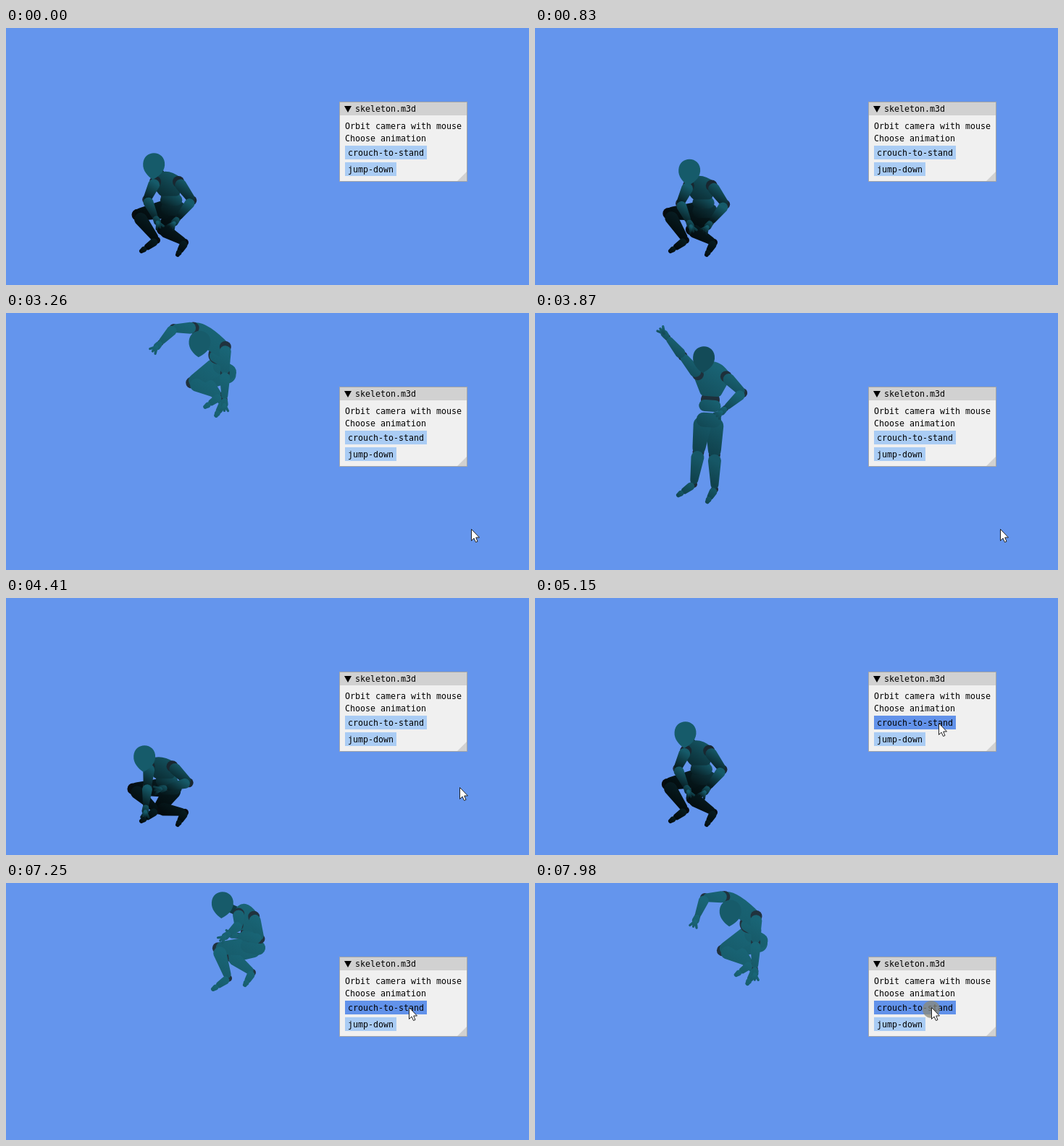
An HTML page with a canvas that plays this animation: 722 by 356 pixels, repeating every 8000 ms.

```html
<!DOCTYPE html>
<html lang="en">
<head>
<meta charset="utf-8">
<title>Skeleton animation</title>
<style>
  html, body { margin: 0; width: 722px; height: 356px; overflow: hidden; background: #6495ed; }
  canvas, svg { position: absolute; left: 0; top: 0; display: block; }
  text { font: 11.63px "DejaVu Sans Mono", monospace; fill: #000; }
</style>
</head>
<body>
<canvas id="stage" width="722" height="356"></canvas>
<svg width="722" height="356">
  <rect x="460.5" y="102.5" width="176" height="110" fill="#f0f0f0"/>
  <rect x="461" y="103" width="175" height="18" fill="#d1d1d1"/>
  <path d="M636 199V212H623Z" fill="#d1d1d1"/>
  <rect x="460.5" y="102.5" width="176" height="110" fill="none" stroke="#a1a4a8"/>
  <path d="M467 108H477L472 117Z"/>
  <text x="482" y="116">skeleton.m3d</text>
  <text x="468" y="140">Orbit camera with mouse</text>
  <text x="468" y="157">Choose animation</text>
  <rect id="stand" x="468" y="163" width="113" height="19"/>
  <text x="472" y="177">crouch-to-stand</text>
  <rect x="468" y="186" width="71" height="19" fill="#aaccf4"/>
  <text x="472" y="200">jump-down</text>
  <circle id="click" cx="547" cy="175" r="12" fill="#8b8878" fill-opacity=".75"/>
  <path id="cursor" d="M.5 .5V16.5L4 13L6.5 18.5L9 17.5L6.7 12H11.5Z" fill="#fff" stroke="#222"/>
</svg>
<script>
const LOOP = 8000, CYCLE = 4780, OFFSET = 3230;
const ctx = document.getElementById('stage').getContext('2d');
const byId = id => document.getElementById(id);
const clamp = (v, lo, hi) => Math.min(hi, Math.max(lo, v));
const mix = (a, b, u) => a.map((v, i) => v + (b[i] - v) * u);
const add = (a, b, s = 1) => [a[0] + b[0] * s, a[1] + b[1] * s];
const between = (a, b) => [b[0] - a[0], b[1] - a[1]];

// A pose fixes the trunk, wrists and ankles; elbows and knees follow from bone lengths.
const perch = {
  head: [306, 29], shoulderL: [326, 42], shoulderR: [347, 46], pelvis: [344, 88],
  handL: [313, 69], handR: [324, 72], footL: [307, 132], footR: [340, 124]
};
const vault = {
  head: [270, 41], shoulderL: [262, 19], shoulderR: [306, 46], pelvis: [306, 76],
  handL: [226, 46], handR: [304, 118], footL: [299, 112], footR: [304, 122]
};
const drop = {
  head: [233, 64], shoulderL: [225, 85], shoulderR: [264, 88], pelvis: [240, 148],
  handL: [183, 34], handR: [263, 132], footL: [219, 237], footR: [248, 244]
};
const crouch = {
  head: [204, 191], shoulderL: [206, 213], shoulderR: [238, 213], pelvis: [231, 250],
  handL: [206, 262], handR: [237, 264], footL: [208, 294], footR: [247, 297]
};

// Moves the body over planted feet, the head most and the pelvis least.
function lean(pose, dx, dy) {
  const weight = { head: 1, pelvis: .4, footL: 0, footR: 0 };
  return Object.fromEntries(Object.entries(pose).map(
    ([part, p]) => [part, add(p, [dx, dy], weight[part] ?? .65)]));
}
const blend = (a, b, u) => Object.fromEntries(
  Object.keys(a).map(part => [part, mix(a[part], b[part], u)]));

const leap = { ...blend(vault, drop, .4), handL: [160, 18] };
const lowCrouch = { ...lean(crouch, -13, 31), handL: [193, 288], handR: [221, 263] };
const landing = { ...lean(lowCrouch, 20, -75), handL: [153, 190] };

const poseKeys = [
  [0, perch], [900, lean(perch, -7, 1)], [1640, vault], [2010, leap], [2320, drop],
  [2540, landing], [2860, lowCrouch], [3230, crouch], [3500, lean(crouch, 2, -3)],
  [4000, lean(crouch, 9, 8)], [CYCLE, lean(crouch, 9, 11)]
].map(([time, pose]) => [time, Object.values(pose).flat()]);
const parts = Object.keys(perch);

const cursorKeys = [
  [2200, [663, 360]], [2460, [644, 303]], [2800, [642, 299]], [4190, [642, 299]],
  [4410, [626, 262]], [5200, [556, 172]], [7500, [556, 172]], [7850, [547, 172]]
];

// Monotone cubic interpolation: smooth, with no overshoot at holds.
function sample(keys, t) {
  const last = keys.length - 1;
  t = clamp(t, keys[0][0], keys[last][0]);
  let k = 0;
  while (k < last - 1 && t >= keys[k + 1][0]) k++;
  const [t0, from] = keys[k], [t1, to] = keys[k + 1], h = t1 - t0, u = (t - t0) / h;
  const slope = (n, i) => n < 0 || n >= last ? 0
    : (keys[n + 1][1][i] - keys[n][1][i]) / (keys[n + 1][0] - keys[n][0]);
  const tangent = (n, i) => {
    const a = slope(n - 1, i), b = slope(n, i);
    return a * b > 0 ? 2 * a * b / (a + b) : 0;
  };
  const ease = u * u * (3 - 2 * u);
  return from.map((p, i) => p + (to[i] - p) * ease
    + h * u * (1 - u) * ((1 - u) * tangent(k, i) - u * tangent(k + 1, i)));
}

// Middle joint of two bones of equal length; a positive side bends to the left of a hanging limb.
function bend(a, b, bone, side) {
  const [dx, dy] = between(a, b), d = Math.hypot(dx, dy) || 1;
  const height = Math.sqrt(Math.max(0, bone * bone - d * d / 4)) * side;
  return add(mix(a, b, .5), [-dy / d, dx / d], height);
}

const teal = b => `rgb(${25 * b},${101 * b},${118 * b})`;

function drawFigure(pose) {
  const { head, shoulderL, shoulderR, pelvis, handL, handR, footL, footR } = pose;
  const chest = mix(shoulderL, shoulderR, .5), spine = between(chest, pelvis);
  const span = between(shoulderL, shoulderR), width = Math.hypot(...span);

  // Lower on the stage the figure turns away from the light, the legs most.
  const gloom = clamp((pelvis[1] - 90) / 160, 0, 1) ** 1.5;
  const upper = 1 - .22 * gloom, lower = 1 - .76 * gloom;

  const shade = (c, r, light) => {
    const g = ctx.createLinearGradient(c[0] + r * .6, c[1] - r, c[0] - r * .6, c[1] + r);
    g.addColorStop(0, teal(light * (1 + .15 * gloom)));
    g.addColorStop(1, teal(light * (.9 - .55 * gloom)));
    return g;
  };
  const joint = (p, r, light) => {
    ctx.fillStyle = `rgb(${32 * light},${50 * light},${62 * light})`;
    ctx.beginPath();
    ctx.arc(...p, r, 0, 7);
    ctx.fill();
  };
  const limb = (a, b, ra, rb, light) => {
    const [dx, dy] = between(a, b), dir = Math.atan2(dy, dx), q = Math.PI / 2;
    ctx.fillStyle = shade(mix(a, b, .5), Math.max(ra, rb) * 1.4, light);
    ctx.beginPath();
    ctx.arc(...a, ra, dir + q, dir + 3 * q);
    ctx.arc(...b, rb, dir - q, dir + q);
    ctx.fill();
  };
  const segment = (a, b, ra, rb, light) => limb(mix(a, b, .17), mix(a, b, .87), ra, rb, light);

  function leg(side, ankle, bone, step) {
    const hip = add(pelvis, span, .2 * side), knee = bend(hip, ankle, bone, 1);
    const toe = add(ankle, step);
    joint(knee, 8, lower);
    joint(ankle, 5, lower);
    segment(hip, knee, 12.5, 9, lower);
    segment(knee, ankle, 9, 5.5, lower);
    limb(mix(ankle, toe, .2), mix(ankle, toe, .6), 5.5, 4.5, lower);
    limb(mix(ankle, toe, .85), toe, 4, 3, lower);
  }

  function arm(shoulder, wrist, bone, side) {
    const elbow = bend(shoulder, wrist, bone, side);
    const forearm = between(elbow, wrist), len = Math.hypot(...forearm) || 1;
    const [ux, uy] = forearm.map(v => v / len);
    joint(shoulder, 8, upper);
    joint(elbow, 6.5, upper);
    joint(wrist, 4, upper);
    segment(shoulder, elbow, 8, 6, upper);
    segment(elbow, wrist, 7, 4.5, upper);
    limb(add(wrist, [ux, uy], 3), add(wrist, [ux, uy], 7), 4.5, 5, upper);
    for (const spread of [-5, 0, 5])
      limb(add(wrist, [ux, uy], 8), add(wrist, [ux * 16 - uy * spread, uy * 16 + ux * spread]),
        2.4, 1.6, upper);
  }

  function torso() {
    const belly = add(chest, spine, .68), base = add(chest, spine, .36);
    const across = span.map(v => v / width * 9);
    limb(add(pelvis, across, -.8), add(pelvis, across, .8), 10, 10, (upper + lower) / 2);
    joint(add(chest, spine, .55), 13, upper);
    limb(add(belly, across, -.8), add(belly, across, .8), 8, 8, upper);
    const side = s => add(base, across, s);
    ctx.fillStyle = ctx.strokeStyle = shade(add(chest, spine, .25), 24, upper);
    ctx.lineWidth = 13;
    ctx.lineJoin = 'round';
    ctx.beginPath();
    ctx.moveTo(...shoulderL);
    ctx.quadraticCurveTo(...add(chest, spine, -.42), ...shoulderR);
    ctx.lineTo(...side(1));
    ctx.lineTo(...side(-1));
    ctx.closePath();
    ctx.fill();
    ctx.stroke();
  }

  function skull() {
    ctx.fillStyle = shade(head, 18, upper);
    ctx.save();
    ctx.translate(...head);
    ctx.rotate(.08);
    ctx.beginPath();
    ctx.moveTo(0, 19);
    ctx.bezierCurveTo(-7, 15, -15, 8, -15, -2);
    ctx.bezierCurveTo(-15, -23, 15, -23, 15, -2);
    ctx.bezierCurveTo(15, 8, 7, 15, 0, 19);
    ctx.fill();
    ctx.restore();
  }

  // The far elbow tucks in when the trunk is seen from the side.
  const tuck = Math.min(1, (width - 24) / 8);
  leg(1, footR, 36, [-10, 17]);
  leg(-1, footL, 44, [-21, 15]);
  limb(chest, head, 6, 6, upper * .6);
  torso();
  arm(shoulderR, handR, 32, -1);
  arm(shoulderL, handL, 27, tuck);
  skull();
}

function render(now) {
  const t = now % LOOP;
  ctx.clearRect(0, 0, 722, 356);
  const flat = sample(poseKeys, (t + OFFSET) % CYCLE);
  drawFigure(Object.fromEntries(parts.map((part, i) => [part, flat.slice(2 * i, 2 * i + 2)])));

  const [x, y] = sample(cursorKeys, t);
  const hover = x >= 468 && x < 581 && y >= 163 && y < 182;
  byId('cursor').setAttribute('transform', `translate(${Math.round(x)} ${Math.round(y)})`);
  byId('stand').setAttribute('fill', hover ? '#6292ea' : '#aaccf4');
  byId('click').setAttribute('visibility', t >= 7940 ? 'visible' : 'hidden');
}

const start = performance.now();
function tick() {
  render(performance.now() - start);
  requestAnimationFrame(tick);
}
tick();
</script>
</body>
</html>
```
